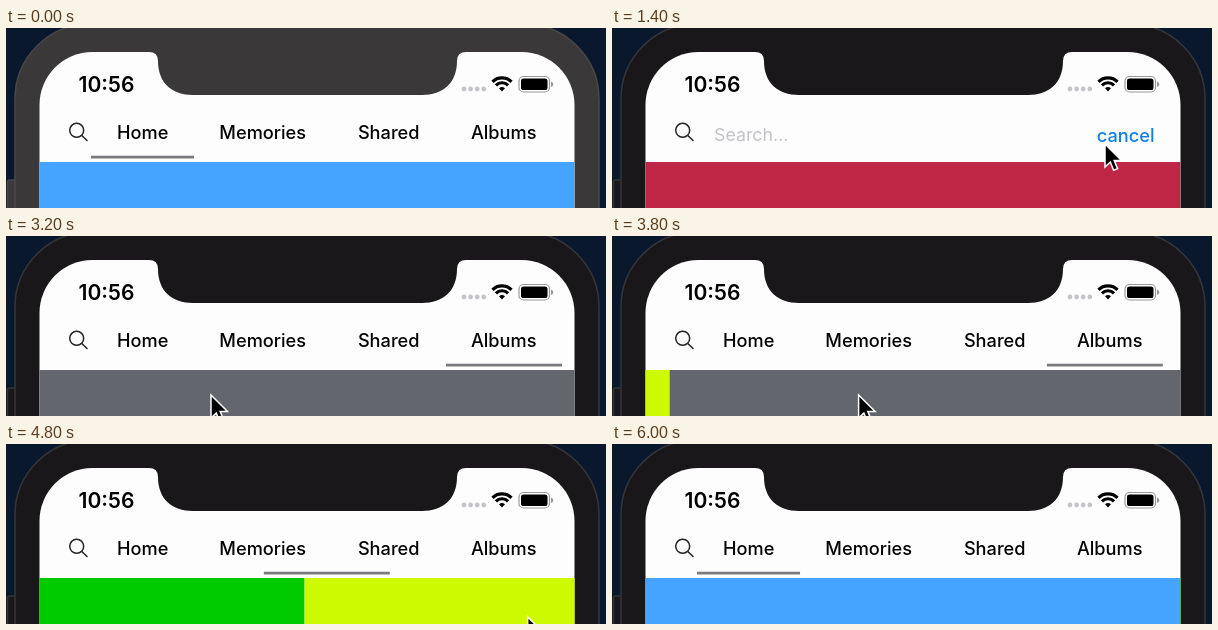
Write an HTML page that moves like this. It is 600 by 180 pixels and loops after 6200 ms.

```html
<!DOCTYPE html>
<html lang="en">
<head>
<meta charset="utf-8">
<title>Swipeable tabs</title>
<style>
  html, body { margin: 0; width: 100%; height: 100%; overflow: hidden; background: #0a182e; }
  svg { display: block; }
  body > svg { width: 100vw; height: 100vh; }
  text { font: 500 18.2px Inter, Roboto, sans-serif; }
  #tabs text { text-anchor: middle; }
  #clock { font-size: 21.1px; font-weight: 600; }
  #placeholder { font-size: 17.8px; font-weight: 400; }
  .bezel { fill: #1a171a; }
  .edge { stroke: #35363b; stroke-width: 1.5; }
  .inactive .bezel { fill: #3a3839; }
  .inactive .edge { stroke: #48474a; }
</style>
</head>
<body>
<svg id="stage" viewBox="0 0 600 180">
  <rect width="600" height="180" fill="#0a182e"/>
  <rect class="bezel edge" x="1.5" y="152" width="10" height="40" rx="2"/>
  <rect class="bezel edge" x="9" y="-4" width="584" height="300" rx="75"/>
  <rect x="33.5" y="24" width="535" height="250" rx="53" fill="#fefdfe"/>
  <path class="bezel" d="M143 23V24Q152 24 152 33C152 55 166 67 187 67H416C437 67 451 55 451 33Q451 24 460 24V23Z"/>

  <!-- Status bar -->
  <text id="clock" x="72.5" y="64">10:56</text>
  <path d="M458 61H479" stroke="#c5c4c8" stroke-width="4.8" stroke-linecap="round" stroke-dasharray="0 6.6"/>
  <g fill="none" stroke="#000" stroke-width="3.2">
    <path d="M486.5 53.8A13.5 13.5 0 0 1 505.5 53.8"/>
    <path d="M489.9 57.3A8.6 8.6 0 0 1 502.1 57.3"/>
  </g>
  <path d="M493 60.3A4.5 4.5 0 0 1 499 60.3L496 63.6Z"/>
  <rect x="513" y="48.5" width="30.5" height="15.5" rx="4.5" fill="none" stroke="#98979b" stroke-width="1.2"/>
  <rect x="515" y="50.5" width="26.5" height="11.5" rx="2.6"/>
  <path d="M545 53.5Q547.3 54.3 547.3 56.2T545 59Z" fill="#98979b"/>

  <!-- Header -->
  <g fill="none" stroke="#222" stroke-width="1.5" stroke-linecap="round">
    <circle cx="70.7" cy="102.3" r="7"/>
    <path d="M75.8 107.5L81 112.5"/>
  </g>
  <g id="tabs">
    <text x="136.7" y="111">Home</text>
    <text x="256.7" y="111">Memories</text>
    <text x="382.7" y="111">Shared</text>
    <text x="497.7" y="111">Albums</text>
    <rect id="indicator" y="127.7" height="2.8" fill="#7b7a7f"/>
  </g>
  <g id="search">
    <text id="placeholder" x="102" y="113" fill="#c3c3c7">Search...</text>
    <text x="542.5" y="113.7" fill="#0f7fe6" text-anchor="end">cancel</text>
  </g>

  <svg x="33.5" y="134" width="535" height="46"><g id="pages"></g></svg>

  <path id="cursor" d="M0 0V23L5.3 18L8.6 26.3L12.6 24.6L9.2 16.5H16.5Z" stroke="#fff" stroke-width="1.5"/>
</svg>
<script>
const LOOP = 6200, STEP = 100, PAGE_WIDTH = 535;
const $ = id => document.getElementById(id);

// The search page sits to the left of the Home page.
const pageColors = ['#bf2646', '#45a4ff', '#00ca00', '#cefa00', '#63666d'];
const tabEdges = [85, 188, 326.5, 440, 556];

// Each swipe moves one page back; reach and dip describe the pointer's swing.
const swipes = [
  { start: 3715, reach: 213, dip: 0 },
  { start: 4550, reach: 342, dip: 15 },
  { start: 5330, reach: 342, dip: 15 }
];

pageColors.forEach((color, i) => {
  const page = document.createElementNS($('stage').namespaceURI, 'rect');
  const attrs = { x: (i - 1) * PAGE_WIDTH, width: PAGE_WIDTH, height: 46, fill: color };
  for (const name in attrs) page.setAttribute(name, attrs[name]);
  $('pages').append(page);
});

// Smooth step from 0 to 1.
function ramp(t, start, duration) {
  const k = Math.min(1, Math.max(0, (t - start) / duration));
  return k * k * (3 - 2 * k);
}

// A dragged page gains speed, then settles.
const settle = time => 1 - Math.exp(-((Math.max(0, time) / 291) ** 2.5));

function edgeAt(position) {
  const i = Math.min(Math.floor(position), tabEdges.length - 2);
  return tabEdges[i] + (tabEdges[i + 1] - tabEdges[i]) * (position - i);
}

function pointerAt(t) {
  const enter = ramp(t, 100, 300), toCancel = ramp(t, 800, 500), toAlbums = ramp(t, 2100, 200);
  const toPage = ramp(t, 2700, 480), leave = ramp(t, 5700, 150);
  let x = 73 + 420 * toCancel - 288 * toPage;
  let y = 190 - 86 * enter + 12 * toCancel - 15 * toAlbums + 58 * toPage + 60 * leave;
  for (const { start, reach, dip } of swipes) {
    const swing = ramp(t, start, 300) - ramp(t, start + 490, 300);
    x += reach * swing;
    y += dip * swing;
  }
  return [x, y];
}

function draw(t) {
  const search = ramp(t, 700, 350) - ramp(t, 1550, 350);
  const swiped = swipes.reduce((sum, { start }) => sum + settle(t - start), 0);
  const position = 3 * ramp(t, 2550, 400) - swiped - search;
  const tab = Math.max(0, position);
  const left = edgeAt(tab);

  $('stage').classList.toggle('inactive', t < 500);
  $('pages').setAttribute('transform', `translate(${-position * PAGE_WIDTH})`);
  $('indicator').setAttribute('x', left);
  $('indicator').setAttribute('width', edgeAt(tab + 1) - left);
  $('tabs').setAttribute('opacity', 1 - search);
  $('search').setAttribute('opacity', search);
  $('cursor').setAttribute('transform', `translate(${pointerAt(t)})`);
}

const startTime = performance.now();
function tick() {
  const t = (performance.now() - startTime) % LOOP;
  draw(Math.floor(t / STEP) * STEP);
  requestAnimationFrame(tick);
}
tick();
</script>
</body>
</html>
```
